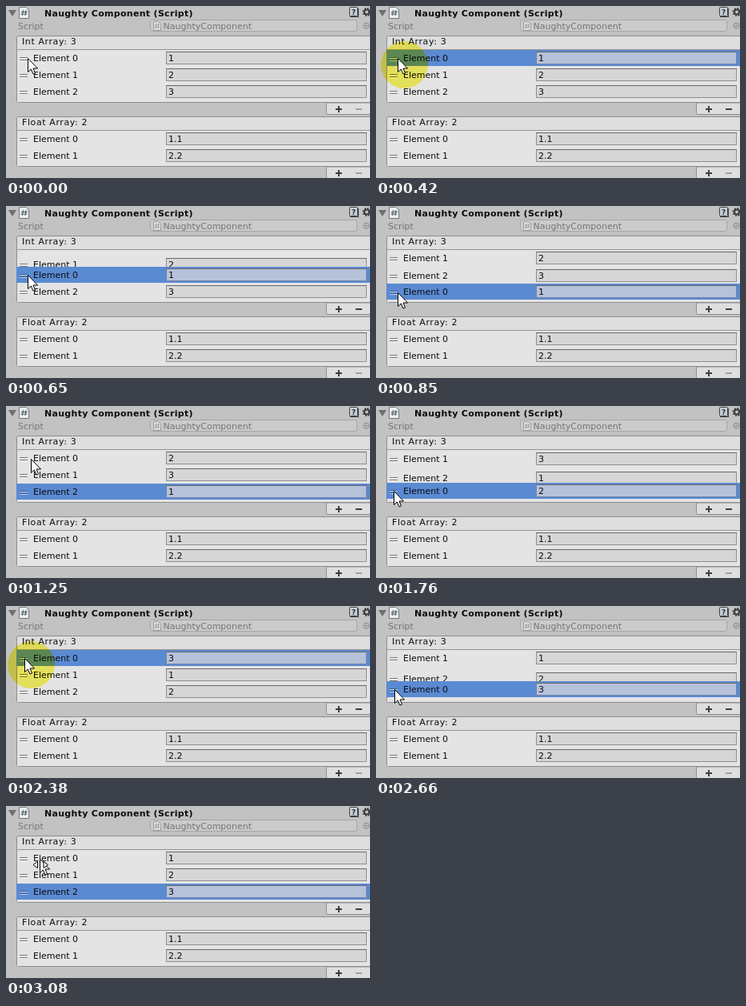
These frames come from a looping animation (455x215 px, 3.43 s). An HTML page:

```html
<!DOCTYPE html>
<html lang="en">
<head>
<meta charset="utf-8">
<title>Reorderable list</title>
<style>
  html, body { margin: 0; width: 100%; height: 100%; overflow: hidden; background: #c2c2c2; }
  svg { display: block; width: 455px; height: 215px; }
  text { font: 11px "DejaVu Sans", sans-serif; fill: #0c0c0c; white-space: pre; }
  .title { font-weight: bold; letter-spacing: .3px; }
  .head { letter-spacing: .6px; }
  .dim { fill: #747474; }
  .panel { fill: #dedede; stroke: #8e8e8e; }
  .field { fill: #d6d6d6; stroke: #8f8f8f; }
  .edge { stroke: #686868; }
  .grip { stroke: #777; }
  .shine { stroke: #f2f2f2; }
  .bar { fill: none; }
  .on .bar { fill: #5a8ad2; }
  .on .field { fill: #b6c1da; stroke: #7485a8; }
  .on .grip { stroke: #435f8f; }
  .on .shine { stroke: #b9cdee; }
  .sign { stroke: #3c3c3c; stroke-width: 2; }
  .off { stroke: #a0a0a0; }
  .arrow { fill: #fff; stroke: #000; stroke-linejoin: round; }
  #click { fill: #fffa64; mix-blend-mode: multiply; }
</style>
</head>
<body>
<svg viewBox="0 0 455 215">
  <rect width="455" height="215" fill="#c2c2c2"/>

  <path d="M3 5H13L8 13Z" fill="#707070"/>
  <path d="M16.5 1.5H25L28.5 5V15.5H16.5Z" fill="#eef1f3" stroke="#6d7880"/>
  <path d="M21.500 5 20.500 12M25 5 24 12M19 7.500H27M18.500 10H26.500" stroke="#4a5a64"/>
  <text class="title" x="48" y="13">Naughty Component (Script)</text>

  <rect x="429.500" y="1.500" width="10" height="11" rx="1" fill="#c9ced2" stroke="#3a434a"/>
  <path d="M430 13.500H441M440.500 3V13" stroke="#3a434a"/>
  <text x="432" y="11" style="font-size:9px;font-weight:bold;fill:#2c3238">?</text>
  <circle cx="451" cy="7.500" r="3" fill="none" stroke="#3c3c3c" stroke-width="2"/>
  <circle cx="451" cy="7.500" r="4.500" fill="none" stroke="#3c3c3c" stroke-width="2" stroke-dasharray="1.800 1.734"/>

  <text class="dim" x="15" y="29">Script</text>
  <rect x="180.500" y="17.500" width="258" height="14" rx="2" fill="#cbcbcb" stroke="#a6a6a6"/>
  <path d="M184.500 19.500H190L193.500 22V30.500H184.500Z" fill="#d9dbdd" stroke="#989ea3"/>
  <path d="M188 22 187 28M191 22 190 28M186 24H192M186 26.500H192" stroke="#8f9aa1" stroke-width=".8"/>
  <text class="dim" x="196.500" y="29">NaughtyComponent</text>
  <circle cx="450.500" cy="24.500" r="3.500" fill="none" stroke="#858585"/>
  <circle cx="450.500" cy="24.500" r="1.200" fill="#858585"/>

  <g id="lists"></g>
  <circle id="click" r="29.500"/>
  <g id="cursor">
    <path class="arrow" d="M.5 .5V17.500L4.300 14 7 20 9.500 19 7 13H12.500Z"/>
    <path id="slide" class="arrow" d="M-2.500 3.500V11.500L-8 7.500ZM5 3.500V11.500L10.500 7.500Z"/>
  </g>
</svg>
<script>
const LOOP = 3430, ROW = 21, TOP = 65, REACH = 44, SETTLE = 52;
const $ = id => document.getElementById(id);

// Each drag takes the top row to the bottom; x runs from grab to release.
const drags = [
  { press: 420, start: 557, dur: 335, drop: 960, x: [27, 27] },
  { press: 1350, start: 1542, dur: 295, drop: 1900, x: [29, 22] },
  { press: 2340, start: 2408, dur: 380, drop: 2830, x: [23, 23] }
];
// Pointer travel after each drop: begin, end, target.
const returns = [
  { from: 975, to: 1250, x: 31, y: 66 },
  { from: 1920, to: 2300, x: 23, y: 65 },
  { from: 2850, to: 3080, x: 42, y: 66 }
];

const rowMarkup = (label, value) => `
  <rect class="bar" x="13" y="-10" width="442" height="20"/>
  <path class="grip" d="M17 -.5H27M17 2.500H27"/>
  <path class="shine" d="M17 .5H27M17 3.500H27"/>
  <text x="34" y="4">${label}</text>
  <rect class="field" x="200.500" y="-7.500" width="250" height="15"/>
  <path class="edge" d="M200 -7.500H451"/>
  <text x="203" y="4">${value}</text>`;

function addList(title, top, values) {
  const bottom = top + 21 + values.length * ROW;
  const mid = bottom + 8;
  const rows = values.map((v, i) =>
    `<g class="row" transform="translate(0 ${top + 28 + i * ROW})">${rowMarkup("Element " + i, v)}</g>`);
  $("lists").insertAdjacentHTML("beforeend", `
    <path class="panel" d="M400.500 ${bottom}V${bottom + 12.5}Q400.500 ${bottom + 14.5} 402.500 ${bottom + 14.5}H460V${bottom}Z"/>
    <rect class="panel" x="13.500" y="${top + .5}" width="450" height="${bottom - top - 1}" rx="2"/>
    <rect x="14" y="${top + 18}" width="441" height="${bottom - top - 19}" fill="#e4e4e4"/>
    <path d="M14 ${top + 17.5}H455" stroke="#949494"/>
    <text class="head" x="20" y="${top + 11}">${title}</text>
    <g class="rows">${rows.join("")}</g>
    <path class="sign" d="M412 ${mid}H420M416 ${mid - 4}V${mid + 4}"/>
    <path class="sign off minus" d="M437 ${mid}H445"/>`);
}
addList("Int Array: 3", 37, [1, 2, 3]);
addList("Float Array: 2", 138, ["1.1", "2.2"]);

const holder = document.querySelector(".rows");
const rows = [...holder.children];
const minus = document.querySelector(".minus");

const clamp = p => Math.min(1, Math.max(0, p));
const mix = (a, b, p) => a + (b - a) * p;
const smooth = p => p * p * (3 - 2 * p);
const move = (el, x, y) => el.setAttribute("transform", `translate(${x} ${y})`);

const progress = (d, t) => 1 - (1 - clamp((t - d.start) / d.dur)) ** 2;
const crossing = (d, dist) => d.start + d.dur * (1 - Math.sqrt(1 - dist / REACH));

function placeRow(id, index, y, selected) {
  const row = rows[id];
  row.querySelector("text").textContent = "Element " + index;
  row.classList.toggle("on", selected);
  move(row, 0, Math.round(y));
}

function pointer(k, t) {
  if (k < 0) return [drags[0].x[0], TOP];
  const d = drags[k], r = returns[k], next = drags[k + 1];
  const q = progress(d, t), back = smooth(clamp((t - r.from) / (r.to - r.from)));
  let x = mix(mix(...d.x, q), r.x, back);
  let y = mix(TOP + REACH * q, r.y, back);
  if (next && t > r.to) {
    const p = clamp((t - r.to) / (next.press - r.to));
    x = mix(x, next.x[0], p);
    y = mix(y, TOP, p);
  }
  return [x, y];
}

function draw(t) {
  const k = drags.filter(d => t >= d.press).length - 1;
  const d = drags[k];
  const held = d && t < d.drop;
  const first = d ? k + (held ? 0 : 1) : 0;

  for (let i = 0; i < 3; i++) {
    const id = (first + i) % 3;
    let y = TOP + i * ROW;
    if (held && i === 0) y += Math.min(2 * ROW, REACH * progress(d, t));
    if (held && i > 0) {
      const since = t - crossing(d, (i - .5) * ROW);
      if (since > 0) y -= ROW * (1 - Math.exp(-since / SETTLE));
    }
    placeRow(id, i, y, id === k);
  }
  // The selected row is painted last.
  if (d && holder.lastElementChild !== rows[k]) holder.append(rows[k]);
  minus.classList.toggle("off", !d);

  const [x, y] = pointer(k, t).map(Math.round);
  move($("cursor"), x, y);
  $("slide").style.display = !held && x > 34 ? "" : "none";
  move($("click"), x + 8.5, y + 8.5);
  $("click").style.display = held && t < d.press + 115 ? "" : "none";
}

const begin = performance.now();
function tick() {
  draw((performance.now() - begin) % LOOP);
  requestAnimationFrame(tick);
}
tick();
</script>
</body>
</html>
```
